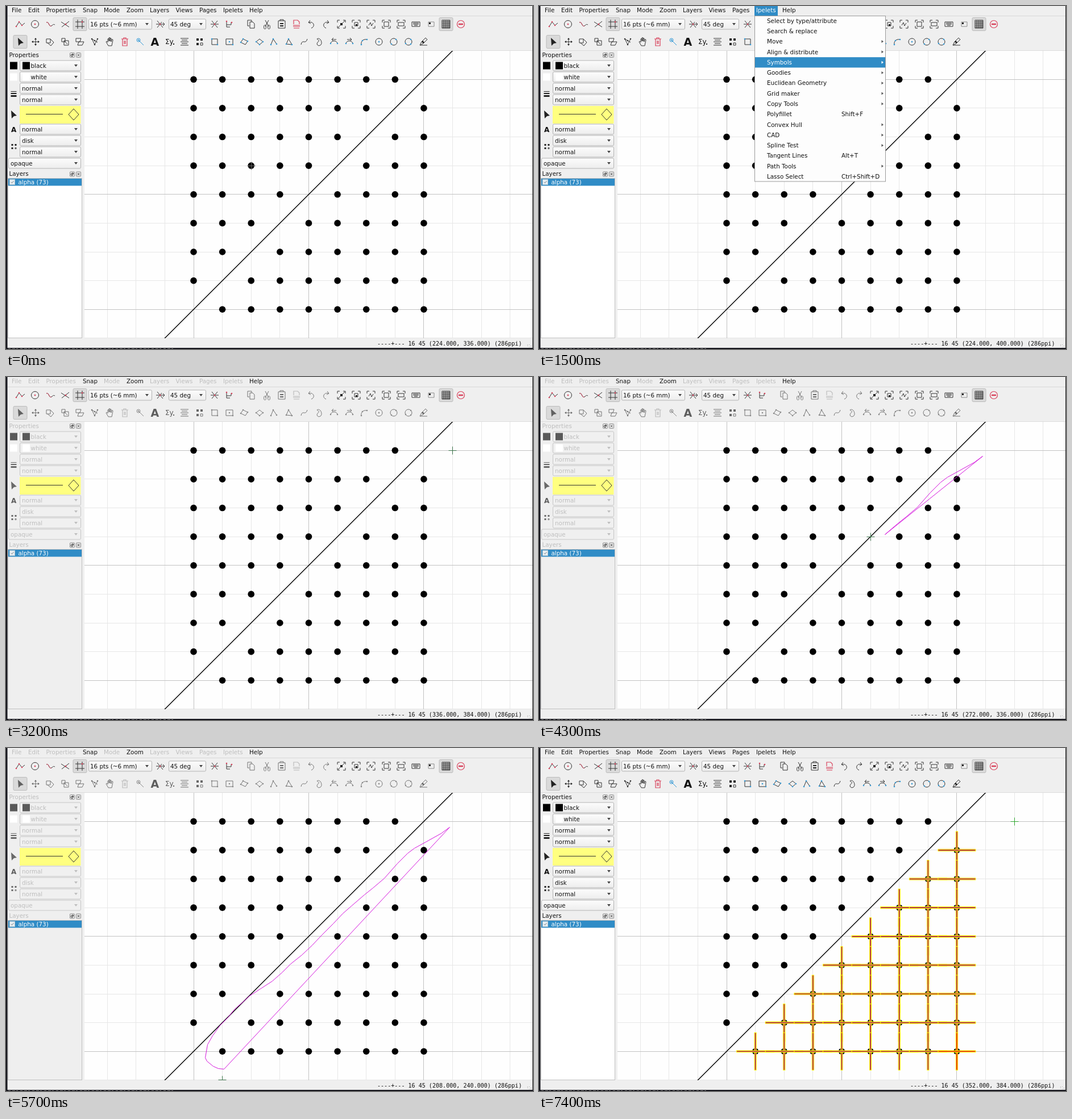
Recreate the animation shown at these times as an HTML page. Size 927 by 604 pixels, loop 8000 ms.

```html
<!DOCTYPE html>
<html>
<head>
<meta charset="utf-8">
<style>
html, body { margin: 0; width: 100%; height: 100%; overflow: hidden; background: #efefef; }
svg { display: block; width: 927px; height: 604px; }
text { font: 10.35px "DejaVu Sans", sans-serif; fill: #111; white-space: pre; }
text.w { fill: #fff; }
#status { font: 10.07px "DejaVu Sans Mono", monospace; }
.k, .b, .r, .x, .kd, .bd, .rd, .g { fill: none; stroke: #333; stroke-width: 1; }
.b, .bd { stroke: #3399d6; }
.r, .rd { stroke: #d8405a; }
.x { stroke: #d8405a; stroke-width: 1.2; }
.g { stroke: #8a8a8a; }
.kd, .bd, .rd { stroke-width: 2.6; stroke-linecap: round; }
.f { fill: #222; }
.off .b, .off .bd { stroke: #555; }
.off .x.can { stroke: #a0a0a0; }
.off .d { fill: #bebebe; }
.off .sw { fill: #5a5a5a; }
.off .c { fill: #f0f0f0; stroke: #c6c6c6; }
.off .list { fill: #efefef; }
.off .dim { opacity: .65; }
</style>
</head>
<body>
<svg id="stage" viewBox="0 0 927 604"></svg>
<script>
const LOOP = 8000, X0 = 330, Y0 = 129.3, STEP = 50.62;
const col = c => X0 + c * STEP, row = r => Y0 + r * STEP;
const out = [];
const add = s => out.push(s);
const rect = (x, y, w, h, fill, extra = '') =>
  add(`<rect x="${x}" y="${y}" width="${w}" height="${h}" fill="${fill}" ${extra}/>`);
const text = (x, y, s, cls = '') =>
  add(`<text x="${x}" y="${y + 3.7}" class="${cls}">${s.replace('&', '&amp;')}</text>`);
const line = (x1, y1, x2, y2, stroke, w = 1) =>
  `<line x1="${x1}" y1="${y1}" x2="${x2}" y2="${y2}" stroke="${stroke}" stroke-width="${w}"/>`;
const group = (id, body, cls = '') => { add(`<g id="${id}" class="${cls}">`); body(); add('</g>'); };
// each part is a class letter, a space and the path data
const icon = (x, y, ...parts) => {
  add(`<g transform="translate(${x} ${y})">`);
  for (const p of parts) {
    const i = p.indexOf(' ');
    add(`<path class="${p.slice(0, i).replace('.', ' ')}" d="${p.slice(i + 1)}"/>`);
  }
  add('</g>');
};
const combo = (x, y, w, s, tx = x + 3.5, off = false) => {
  rect(x + .5, y - 9, w - 1, 18, 'url(#face)', `rx="2" stroke="#b4b4b4" class="${off ? 'c' : ''}"`);
  text(tx, y, s, off ? 'd' : '');
  add(`<path class="${off ? 'd' : ''}" fill="#444" d="M${x + w - 12} ${y - 2}h6l-3 4z"/>`);
};
const pressed = (x, y) => rect(x - 12, y - 11.5, 24, 23, '#dadada', 'rx="2" stroke="#bcbcbc"');

// window
add(`<defs><linearGradient id="face" x2="0" y2="1"><stop stop-color="#fcfcfc"/>
<stop offset="1" stop-color="#ededed"/></linearGradient>
<clipPath id="view"><path d="M138 79H926V585H138z"/></clipPath></defs>`);
rect(0, 0, 927, 604, '#efefef');
add(line(3, 17.5, 926, 17.5, '#d8d8d8') + line(3, 78.5, 926, 78.5, '#dcdcdc'));

const menus = [['File', 10], ['Edit', 39], ['Properties', 70.5], ['Snap', 135, 1], ['Mode', 172],
  ['Zoom', 212, 1], ['Layers', 253], ['Views', 298.5], ['Pages', 340], ['Ipelets', 382], ['Help', 428, 1]];
for (const [s, x, on] of menus) text(x, 7.7, s, on ? '' : 'd');

// upper toolbar
const ty = 32, circle = r => `M${-r} 0a${r} ${r} 0 1 0 ${2 * r} 0a${r} ${r} 0 1 0 ${-2 * r} 0`;
const corners = 'M-7 -3v-4h4M3 -7h4v4M7 3v4h-4M-3 7h-4v-4';
icon(25, ty, 'k M-7 4L-2 -4 3 2 8 -2', 'rd M-7 4h0M-2 -4h0M3 2h0');
icon(51, ty, 'k ' + circle(6.5), 'rd M0 0h0');
icon(78, ty, 'k M-7 -3C-3 -6 -2 6 2 3S5 0 8 1', 'r M-7 -3C-3 -6 -2 6 2 3');
icon(104, ty, 'k M-7 -4L7 5M-6 5L7 -5', 'rd M1 0h0');
pressed(130, ty);
icon(130, ty, 'k M-4 -8V8M4 -8V8M-8 -4H8M-8 4H8', 'rd M4 -4h0');
combo(145, ty, 112, '16 pts (~6 mm)', 148);
icon(271, ty, 'k M-7 0H8M-5 -6L5 6M-5 6L3 -4M5 -3l3 3-3 3', 'rd M0 0h0');
combo(286, ty, 66, '45 deg', 289);
icon(367, ty, 'k M-7 0H7M-5 -6L5 6M-5 6L5 -6', 'rd M0 0h0');
icon(393, ty, 'k M-5 -5v6h8v-4h2M-5 1v4h6', 'rd M-5 -5h0M4 -3h0');
group('edit', () => {
  icon(431, ty, 'k M-6 -7h7v3M-6 -7v10h3M-2 -4h5l3 3v8h-8z');
  icon(459, ty, 'k M-3 -7L3 4M3 -7L-3 4M-5 5a2 2 0 1 0 3 0a2 2 0 1 0 -3 0M2 5a2 2 0 1 0 3 0a2 2 0 1 0 -3 0');
  icon(485, ty, 'k M-6 -6h12v13h-12zM-3 -6v-2h6v2', 'f M-3 -2h6v2h-6zM-3 2h6v2h-6z');
  icon(511, ty, 'x.can M-5 0v-7h7l3 3v4M-6 2h12M-6 4h12M-5 7h10');
  icon(537, ty, 'k M-2 -7l-3 4 4 2M-5 -3C4 -6 8 4 0 7');
  icon(563, ty, 'k M2 -7l3 4-4 2M5 -3C-4 -6 -8 4 0 7');
}, 'dim');
icon(590, ty, 'k ' + corners + 'M1 -1l5 -5M-1 1l-5 5', 'f M-2 -2h4v4h-4z');
icon(616, ty, 'k ' + corners + 'M-3 -3h6v6h-6z', 'f M-1 0h3v3h-3z');
icon(642, ty, 'k ' + corners + 'M-4 2L-1 -3 1 3 4 -2');
icon(669, ty, 'k ' + corners + 'M-4 -4h8v8h-8z');
icon(695, ty, 'k ' + corners + 'M-5 -3h10v6h-10z');
icon(721, ty, 'k M-7 -4h14v8h-14zM-5 -2h10M-5 0h10M-3 2h6');
icon(748, ty, 'g M-5 -4h10v8h-10z', 'f M-4 -3h3v3h-3z');
pressed(774, ty);
icon(774, ty, 'k M-7 -7h14v14h-14zM-7 -4H7M-7 -1H7M-7 2H7M-7 5H7M-4 -7V7M-1 -7V7M2 -7V7M5 -7V7');
icon(800, ty, 'x ' + circle(6.5), 'rd M-3 0H3');

// lower toolbar
const ly = 63, arrow = 'f M-4 -7L6 2 1 3 -3 7z';
pressed(25, ly);
group('tools', () => {
  icon(25, ly, arrow);
  icon(52, ly, 'k M-6 0H6M0 -6V6', 'f M-7 0l3-2v4zM7 0l-3-2v4zM0 -7l-2 3h4zM0 7l-2-3h4z');
  icon(78, ly, 'k M-7 -5h7v7h-7zM0 -5l6 6-5 6-6-5');
  icon(104, ly, 'k M-6 -6h6v6h-6zM-2 -2h8v8h-8zM-1 -1l5 5');
  icon(130, ly, 'k M-7 -6h9l-2 6h-7zM-2 0h9l-3 6h-8z');
  icon(156, ly, 'k M-5 -5L0 5 5 -5M-5 -5L5 1', 'kd M-5 -5h0M0 5h0M5 -5h0M0 -2h0');
  icon(183, ly, 'k M-3 7L-7 0q1 -2 3 1v-6q1-1 2 0v4-6q1-1 2 0v6-5q1-1 2 0v6l1-4q2-1 2 1L3 7z');
  icon(209, ly, 'x.can M-6 -5H6M-2 -5v-2h4v2M-4 -5v12h8v-12M-1 -2v6M1 -2v6');
  icon(236, ly, 'b M-2 -2L6 6M-6 -3a3 3 0 1 0 6 0a3 3 0 1 0 -6 0', 'bd M-3 -3h0');
  add('<text x="254.5" y="69.5" style="font-size:19px;font-weight:bold">A</text>');
  add('<text x="280" y="67" style="font-size:12px">Σy</text>');
  icon(295, ly, 'f M-1 3h2v2h-2z');
  icon(314, ly, 'k M-7 -6H7M-5 -3H5M-7 0H7M-5 3H5M-7 6H7');
  icon(340, ly, 'f M-5 -6h4v4h-4zM2 -6h4v4h-4zM-5 2h4v4h-4z', 'k M2 2h4v4h-4z');
  icon(367, ly, 'k M-5 -5H5V5H-5z', 'bd M-5 -5h0M5 5h0');
  icon(393, ly, 'k M-6 -5H6V5H-6z', 'bd M0 0h0M6 5h0');
  icon(419, ly, 'k M-6 1L-2 -5 6 -1 2 5z', 'bd M-6 1h0M-2 -5h0M6 -1h0');
  icon(446, ly, 'k M-6 0L0 -5 6 0 0 5z', 'bd M-6 0h0M0 5h0M6 0h0');
  icon(471, ly, 'k M-5 5L-1 -5 5 4', 'bd M-5 5h0M-1 -5h0M5 4h0');
  icon(498, ly, 'k M-5 4L-1 -5 5 5z', 'bd M-5 4h0M-1 -5h0M5 5h0');
  icon(525, ly, 'k M-6 5C-4 -6 2 6 5 -5');
  icon(551, ly, 'k M-4 -5C2 -9 7 3 2 6S-6 3 -2 0-2 -2 -4 -5');
  icon(577, ly, 'k M-6 3C-5 -3 5 -3 6 3M-4 -4H4M-1 -7l-3 3 3 3', 'bd M-6 3h0M6 3h0');
  icon(604, ly, 'k M-6 3C-5 -3 5 -3 6 3M-4 -4H4M1 -7l3 3-3 3', 'bd M-6 3h0M6 3h0');
  icon(630, ly, 'k M-5 5C-6 -2 -1 -5 5 -4', 'bd M-5 5h0M5 -4h0M-3 -2h0');
  icon(656, ly, 'k ' + circle(6), 'bd M0 0h0');
  icon(682, ly, 'k ' + circle(6), 'bd M4 -4h0M-4 4h0');
  icon(708, ly, 'k ' + circle(6), 'bd M4 -4h0M-5 3h0M4 4h0');
  icon(734, ly, 'k M-6 6l3-6L4 -7 7 -4 0 3zM-6 6H7', 'f M-3 0L-1 -2 2 1 0 3z');
}, 'dim');

// side panel
const title = (y, s) => {
  text(5.5, y, s, 'd');
  for (const x of [112.5, 123.5]) rect(x, y - 3.5, 8, 8, '#efefef', 'rx="1" stroke="#888"');
  icon(116.5, y + .5, 'k M-2 -1h3v3h-3zM0 -2h2v2');
  icon(127.5, y + .5, 'k M-2 -2l4 4M-2 2l4-4');
};
title(86, 'Properties');
combo(24, 105, 108, 'black', 43.5, true);
combo(24, 125, 108, 'white', 43.5, true);
for (const [x, w] of [[7, 13], [29, 13]]) {
  rect(x, 98.5, w, 13, '#000', 'class="sw"');
  rect(x, 118.5, w, 13, '#fff');
}
for (const [y, s] of [[145, 'normal'], [165, 'normal'], [217, 'normal'], [237, 'disk'], [257, 'normal']])
  combo(24, y, 108, s, 28, true);
combo(4, 277, 128, 'opaque', 8, true);
group('marks', () => {
  icon(13.5, 155, 'f M-5 -5h10v1h-10zM-5 -2h10v2h-10zM-5 2h10v3h-10z');
  icon(13, 191, arrow);
  add('<text x="9" y="221.5" style="font-size:12px;font-weight:bold">A</text>');
  icon(13.5, 247, 'f M-4 -4h3v3h-3zM2 -4h3v3h-3zM-4 2h3v3h-3z', 'k M2.5 2.5h2v2h-2z');
}, 'dim');
rect(24, 176, 107.5, 31, '#ffff80');
add(line(35, 190.5, 100, 190.5, '#333'));
icon(119, 191, 'k M-9 0L0 -10 9 0 0 10z');
title(295.5, 'Layers');
rect(3.5, 303.5, 130, 281, '#fff', 'stroke="#c0c0c0" class="list"');
rect(4, 304, 129, 12.5, '#308cc6');
rect(6.5, 305.5, 9, 9, '#e4eef4', 'stroke="#b8c8d0"');
icon(11, 310, 'g M-2 0l1.500 2 3-4');
text(21.5, 310, 'alpha (73)', 'w');

// drawing area
rect(138, 79, 788, 506, '#fefefe');
add('<g clip-path="url(#view)">');
for (const major of [false, true])
  for (let i = -3; i <= 11; i++) {
    if ((i % 4 === 0 && i >= 0 && i <= 8) !== major) continue;
    const c = major ? '#c2c2c2' : '#e7e7e7';
    const x = Math.floor(col(i)) + .5, y = Math.floor(row(i)) + .5;
    add(line(x, 79, x, 585, c) + line(138, y, 926, y, c));
  }
add(line(col(-2), row(10), col(10), row(-2), '#000', 1.4));
for (let r = 0; r < 9; r++)
  for (let c = 0; c < 9; c++)
    if (r + c !== 8) add(`<circle cx="${col(c)}" cy="${row(r)}" r="5.8"/>`);

const bar = (x, y, dx, dy, c) => {
  add(line(x - 33.5 * dx, y - 33.5 * dy, x + 33.5 * dx, y + 33.5 * dy, '#ff0', 4.2));
  add(line(x - 32.5 * dx, y - 32.5 * dy, x + 32.5 * dx, y + 32.5 * dy, c, 1.7));
};
group('picked', () => {
  for (let r = 1; r < 9; r++)
    for (let c = 9 - r; c < 9; c++) {
      const tone = r === 8 && c === 8 ? '#e01010' : '#a8185f';
      bar(col(c), row(r), 0, 1, tone);
      bar(col(c), row(r), 1, 0, tone);
    }
});
add('<path id="lasso" fill="none" stroke="#d414dc" transform="translate(.5 .5)"/>');
add('<path id="cross" fill="none" d="M-7 0H7M0 -7V7"/></g>');

// frame and status bar
rect(0, 0, 2.5, 604, '#15151c');
rect(926, 0, 1, 604, '#222');
rect(0, 602, 927, 2, '#15151c');
for (let x = 4; x < 298; x += 7) rect(x, 603, 3 + x % 3, 1, '#777');
for (let i = 0; i < 6; i++) rect(923 - i % 3 * 3, 600 - (i >> 1) * 2, 1, 1, '#aaa');
add('<text id="status" x="653" y="597.5"></text>');

// menu
const items = ['Select by type/attribute', 'Search & replace', 'Move>', 'Align & distribute>', 'Symbols>',
  'Goodies>', 'Euclidean Geometry>', 'Grid maker>', 'Copy Tools>', 'Polyfillet|Shift+F', 'Convex Hull>',
  'CAD>', 'Spline Test>', 'Tangent Lines|Alt+T', 'Path Tools>', 'Lasso Select|Ctrl+Shift+D'];
const IH = 18.29, frame = 'stroke="#9a9a9a"';
group('menu', () => {
  rect(379, 0, 41, 17, '#308cc6');
  text(382, 7.7, 'Ipelets', 'w');
  rect(379.5, 17.5, 230, 291.5, '#fdfdfd', frame);
  rect(380, 17, 229, IH, '#308cc6', 'id="bar"');
  items.forEach((s, i) => {
    const y = 26 + i * IH, [name, key] = s.replace('>', '').split('|');
    add('<g class="item">');
    text(401, y, name);
    if (key) text(532, y, key);
    if (s.endsWith('>')) add(`<path fill="#555" d="M602.500 ${y - 2.5}l3.500 2.500-3.500 2.500z"/>`);
    add('</g>');
  });
});
group('sub', () => {
  rect(609.5, 273.5, 141.500, 54, '#fdfdfd', frame);
  ['Mark intersections', 'Cut at intersections', 'Trim Tool'].forEach((s, i) => text(631, 282 + i * IH, s));
});

const svg = document.getElementById('stage');
svg.innerHTML = out.join('');
const $ = id => document.getElementById(id);
const rows = [...document.querySelectorAll('.item')];

// freehand outline, and the time at which each point index is reached
const pts = [[780,139],[765,150],[738,165],[718,176],[706,185],[688,203],[665,229],[645,246],[630,258],
  [608,277],[592,291],[575,309],[555,329],[538,347],[520,364],[500,380],[485,395],[468,410],[448,423],
  [428,436],[415,448],[402,459],[390,474],[376,488],[363,506],[354,522],[350,545],[353,551],[364,560],
  [373,564],[383,565],[398,569],[436,573],[455,575],[505,575],[520,573],[580,573],[700,573],[762,574],
  [780,571],[790,566],[795,558],[796,548],[800,480],[808,360],[815,240],[813,170]];
const pace = [[3300,0],[3600,3],[4200,8],[4300,9],[5100,23],[5400,26],[5700,30],[6000,32],[6600,42],[7000,46]];
// time, column, row of the snapped cursor
const hops = [[0,2,3],[100,2,1],[200,2,-1],[2700,4,-1],[2800,6,-1],[2900,8,0],[3000,9,1],[3200,9,0]];
// time, highlighted menu item
const picks = [[400,-1],[500,0],[900,1],[1300,2],[1400,3],[1500,4],[1600,5],[1700,7],[1800,8],
  [2000,10],[2100,12],[2200,14],[2400,15]];
const at = (table, t) => table.filter(k => k[0] <= t).pop();
const show = (id, on) => $(id).style.display = on ? '' : 'none';

function trace(t) {
  let i = pace.findIndex(k => k[0] > t);
  if (i < 0) i = pace.length - 1;
  const [t0, a] = pace[i - 1], [t1, b] = pace[i];
  const u = a + (b - a) * Math.min(1, (t - t0) / (t1 - t0));
  const n = Math.floor(u), p = pts[n], q = pts[n + 1] || p;
  return [...pts.slice(0, n + 1), [0, 1].map(j => p[j] + (q[j] - p[j]) * (u - n))];
}

function draw(t) {
  const open = t >= 400 && t < 2500, lasso = t >= 3400 && t < 7200;
  svg.classList.toggle('off', t >= 2500 && t < 7200);
  show('menu', open);
  show('sub', t >= 2300 && t < 2500);
  show('picked', t >= 7200);
  show('lasso', lasso);
  if (open) {
    const sel = at(picks, t)[1];
    show('bar', sel >= 0);
    $('bar').setAttribute('y', 17 + sel * IH);
    rows.forEach((g, i) => {
      for (const e of g.children) e.style.fill = i === sel ? '#fff' : '';
    });
  }
  let [, c, r] = at(hops, t);
  if (lasso) {
    const path = trace(t), [x, y] = path[path.length - 1];
    $('lasso').setAttribute('d', 'M' + path.join('L') + 'z');
    c = Math.round((x - X0) / STEP);
    r = Math.round((y - Y0) / STEP);
  }
  if (t >= 7200) [c, r] = [10, 0];
  const cross = $('cross');
  cross.setAttribute('transform', `translate(${Math.floor(col(c)) + .5} ${Math.floor(row(r)) + .5})`);
  cross.setAttribute('stroke', t < 100 ? '#666' : t >= 7200 ? '#2fa52f' : '#3a7048');
  $('status').textContent = `----+--- 16 45 (${192 + 16 * c}.000, ${384 - 16 * r}.000) (286ppi)`;
}

const start = performance.now();
let shown = -1;
function tick() {
  const t = Math.floor((performance.now() - start) % LOOP / 100) * 100;
  if (t !== shown) draw(shown = t);
  requestAnimationFrame(tick);
}
tick();
</script>
</body>
</html>
```
